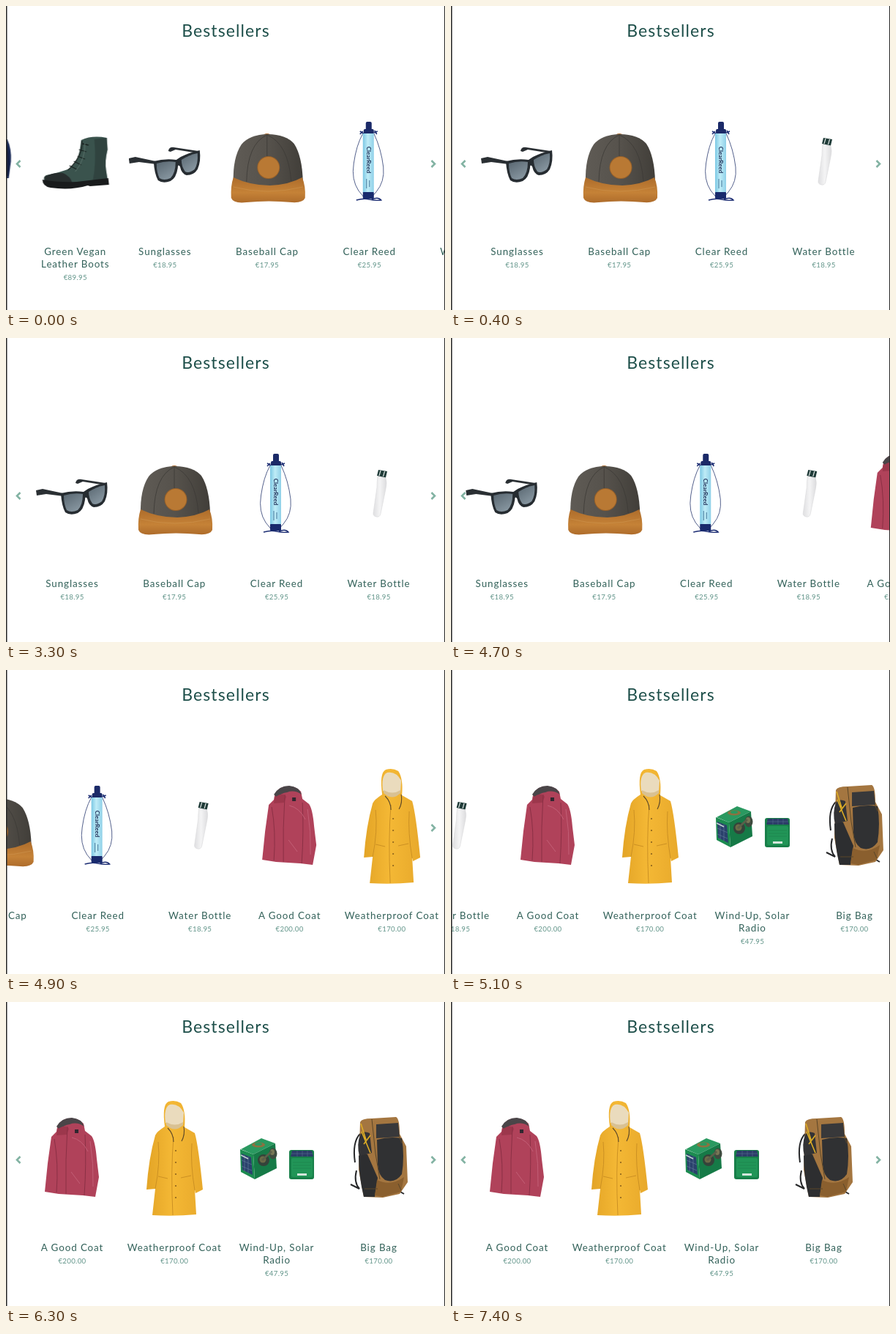
Animation of 600 by 415 pixels, one loop 8000 ms. Source, as an HTML page:

```html
<!DOCTYPE html>
<html lang="en">
<head>
<meta charset="utf-8">
<title>Bestsellers</title>
<style>
  html, body { margin: 0; width: 100%; height: 100%; overflow: hidden; background: #fff; }
  svg { display: block; width: 600px; height: 415px; }
  text { font-family: Lato, Roboto, sans-serif; text-anchor: middle; }
  .title { font-size: 23px; letter-spacing: 1.1px; fill: #1f504b; }
  .name { font-size: 13.4px; letter-spacing: .9px; fill: #326159; }
  .price { font-size: 9.7px; letter-spacing: .3px; fill: #62958a; }
  .label { font-size: 8px; font-weight: 700; fill: #1b2c55; }
  .arrow { fill: none; stroke: #83b3a3; stroke-width: 2.6; }
  .line { fill: none; }
</style>
</head>
<body>
<svg id="stage" viewBox="0 0 600 415">
  <defs>
    <linearGradient id="tube"><stop stop-color="#7cc8e4"/><stop offset=".45" stop-color="#bfecf7"/><stop offset="1" stop-color="#8fd0e8"/></linearGradient>
    <linearGradient id="lens" x2=".6" y2="1"><stop stop-color="#586670"/><stop offset="1" stop-color="#8796a0"/></linearGradient>
    <linearGradient id="felt" x2="1"><stop stop-color="#5f5b55"/><stop offset=".5" stop-color="#56524c"/><stop offset="1" stop-color="#413e39"/></linearGradient>
    <linearGradient id="suede" y2="1" x2="0"><stop stop-color="#ad6c2b"/><stop offset=".6" stop-color="#c58237"/><stop offset="1" stop-color="#ae6c2b"/></linearGradient>
    <linearGradient id="steel" x2="1"><stop stop-color="#dfdfe1"/><stop offset=".5" stop-color="#f4f4f5"/><stop offset="1" stop-color="#dcdcde"/></linearGradient>
    <linearGradient id="rain" x2="1"><stop stop-color="#e3a426"/><stop offset=".45" stop-color="#f4b835"/><stop offset="1" stop-color="#e8a92b"/></linearGradient>
  </defs>
  <text class="title" x="300.5" y="42">Bestsellers</text>
  <path class="arrow" d="M19.5 211l-4.500 4.500 4.500 4.500M581.500 211l4.500 4.500-4.500 4.500"/>
  <g id="pages"></g>
  <path d="M0 0h1.500v415H0zM599 0h1v415h-1z" fill="#292929"/>
</svg>
<script>
const LOOP = 8000, STEP = 100, PAGE = 541.5, SLIDE = 600;
const SLOTS = [90.5, 230.2, 370, 509.5];

const shape = (fill, d, extra = '') => `<path d="${d}" fill="${fill}" ${extra}/>`;
const line = (stroke, width, d) => `<path class="line" d="${d}" stroke="${stroke}" stroke-width="${width}"/>`;
const oval = (fill, x, y, rx, ry = rx) => `<ellipse cx="${x}" cy="${y}" rx="${rx}" ry="${ry}" fill="${fill}"/>`;
const box = (fill, x, y, w, h, r = 0) => `<rect x="${x}" y="${y}" width="${w}" height="${h}" rx="${r}" fill="${fill}"/>`;
const shift = (x, art) => `<g transform="translate(${x})">${art}</g>`;

const jeans = shift(415.5,
  shape('#1b2b58', 'M-88 182H1Q7 195 6 212L3 235H-86Z') + line('#10193a', 2, 'M0 190Q4 210 1 232'));

const boots = shift(415.5,
  shape('#3a534d', 'M102 183Q117 176 137 180L138 196Q134 212 136 224L139 242H56Q47 236 54 231Q74 227 86 222Q97 213 100 197Z') +
  shape('#263532', 'M120 182L137 180 138 196Q134 212 136 224L138 240 118 238Q123 214 120 182Z', 'opacity=".5"') +
  shape('#272d2d', 'M52 233Q64 227 77 228Q87 232 90 242H53Z') +
  shape('#191b1c', 'M49 237Q70 241 96 240L139 235 140 244 114 246 111 245Q88 252 60 248Q49 246 49 237Z') +
  line('#18211f', 1.3, 'M103 184Q105 204 84 224M99 196l10 3M97 205l10 4M92 212l10 5M86 218l10 5M104 188l8 2') +
  line('#5a716a', 1, 'M107 187Q108 209 94 226'));

const sunglasses =
  shape('#2a2f33', 'M41 208L50 206 78 212 79 216 55 213 42 215Z') +
  shape('#2a2f33', 'M95 198Q96 192 103 193L136 198V201L105 196 98 199Z') +
  shape('#262c31', 'M75 212Q90 208 106 210L112 206Q124 200 138 197Q140 212 135 223Q130 231 120 231Q113 229 111 219Q108 215 108 221Q106 235 98 239Q88 243 81 238Q76 229 75 212Z') +
  shape('url(#lens)', 'M79 215Q92 211 105 213Q105 228 98 235Q89 239 83 235Q79 227 79 215Z') +
  shape('url(#lens)', 'M113 210Q124 203 135 201Q136 215 131 223Q123 229 118 226Q113 219 113 210Z');

const cap =
  oval('#a9692c', 230, 176, 4, 2) +
  shape('url(#felt)', 'M184 241Q183 207 195 189Q206 175.500 231 175Q256 175.500 267 188Q278 205 279 239Q234 253 184 241Z') +
  line('#3d3a36', .8, 'M230 176Q203 188 202 240M230 176Q259 188 263 239M230 176V205') +
  shape('url(#suede)', 'M184 234Q207 245 234 245Q260 244 278 234Q283 246 282 262Q279 269 264 268Q232 265 202 268Q184 270 181 262Q180 246 184 234Z') +
  line('#cf954f', .6, 'M184 247Q230 259 279 247') +
  oval('#96602a', 232, 220.5, 15.500) + oval('#b97934', 232, 220.5, 14.500);

const straw =
  line('#41507f', .9, 'M361 174Q352 190 348.500 215Q345 237 355 252L364 263M376 174Q386 195 389 220Q391 240 379 254L371 263') +
  line('#1c2d73', 1.6, 'M357 171l5 3M357 175l4-4M376 173l5-2M377 170l3 5') +
  line('#1c2d73', 1.4, 'M352 265Q362 262 370 264T386 265Q382 260 373 264') +
  box('#1b2a68', 365, 158, 8, 12, 2) + box('#1b2a68', 362, 168, 14, 7, 2) +
  box('url(#tube)', 361, 174, 15, 81) + box('#182a6d', 361, 254, 15, 9, 1) +
  `<text class="label" transform="translate(366 210) rotate(90)">ClearReed</text>` +
  line('#47799a', 1, 'M366 236v13M370 238v9');

const bottle =
  shape('url(#steel)', 'M508 189L519 191Q521 198 519 206L512 240Q511 245 506 244Q501.500 243 502 239L507 204Q507 196 508 189Z', 'stroke="#d9d9db" stroke-width=".6"') +
  shape('#203c39', 'M509 180L521 182 519 190.500 507 188Z') + line('#e6ecea', 1.1, 'M512 181l-2 7M517.5 182l-2 7');

const coat =
  shape('#b0425a', 'M69 177Q70 162 84 159Q98 157 106 166L108 176 117 183Q122 190 124 214L127 239 122 266 105 264 72 262 53 259 57 220 62 184Z') +
  shape('#4a4548', 'M69 170Q76 158 90 158Q103 159 107 170Q97 163 87 167Q79 168 73 174Z') +
  shape('#9c374c', 'M70 174Q81 166 86 173L83 181 69 182Z') +
  line('#8b3045', 1, 'M84 170Q81 215 82 262M108 181Q110 220 107 264M66 187Q72 220 69 260') +
  line('#c4637a', .9, 'M90 185Q104 188 112 204M115 190Q120 220 119 252M89 232l12 16') +
  box('#30272f', 94, 174, 5, 5);

const raincoat =
  shape('url(#rain)', 'M217 170Q213 140 222 136Q231 133 239 138Q246 148 244 171L258 179Q263 196 269 256L259 261 258 256 260 290Q230 293 200 291L204 255 192 256Q195 213 204 182Q206 177 217 170Z') +
  shape('#eadbbd', 'M218 165Q215 144 224 140Q236 138 243 151L242 167Q231 174 218 165Z') +
  shape('#d9c192', 'M219 164Q231 171 242 164V168Q231 179 219 168Z') +
  line('#c88d22', .9, 'M229 184Q225 230 228 291M208 191Q211 220 204 255M254 193Q252 222 258 257M208 238l13 3M239 240l14-3') +
  line('#5d4828', 1.1, 'M221 172Q229 180 229 191M243 170Q245 181 240 190') +
  [203, 219, 235, 251, 267].map(y => oval('#8a621d', 232, y, 1.1)).join('');

const radio =
  shape('#2a9960', 'M321 201L349 186 368 193 338 208Z') +
  shape('#167a47', 'M338 208L368 193 370 227 340 242Z') +
  shape('#1c8b50', 'M320 201L338 208 340 242 321 232Z') +
  shape('#2a416c', 'M322 207L335 212 337 236 323 229Z') +
  line('#7088a6', .5, 'M326 209v22M331 211v22M322 216l14 6M322 224l14 6') +
  oval('#8d7140', 345, 195, 9, 3.5) + oval('#2a9960', 345, 194, 5, 2) +
  oval('#34433a', 352, 216, 8) + oval('#6b6a47', 351, 215, 4.5) +
  oval('#3f4b3f', 365, 207, 5.5, 7.5) + oval('#787756', 364, 205, 3, 4) +
  line('#5b5f4a', 3, 'M350 216l13-12') + line('#c6d2d2', 1.4, 'M321 209l10 5') +
  box('#187f49', 387, 202, 34, 40, 3) + shape('#2b3d67', 'M391 203H418L420 211H389Z') +
  line('#5d7394', .5, 'M398 203v8M405 203v8M412 203v8M390 207h29') +
  box('#219557', 390, 213, 29, 26, 2) + line('#1a824b', .7, 'M392 219h25M392 223h25M392 227h25') +
  box('#d3e6db', 398, 234, 13, 3);

const bag =
  line('#27282a', 2, 'M484 180Q473 191 477 219M479 230Q475 246 483 255L471 249M537 258l7 4') +
  shape('#a47640', 'M484 164Q486 159 500 159L533 157Q538 159 538 180L547 197 549 246 538 262 515 267 489 266 482 229Z') +
  shape('#2d2e30', 'M482 210Q486 205 494 208L508 240 504 266H489Q482 238 482 210Z') +
  shape('#333335', 'M484 181Q489 175 497 179L500 206 483 210Q479 195 484 181Z') +
  shape('#38383a', 'M506 167L536 165 538 184 506 186Z') +
  shape('#303133', 'M507 188Q524 183 541 186Q545 210 541 235Q532 248 518 243Q509 237 508 222Z') +
  shape('#8a5f2e', 'M507 243Q526 252 544 239L540 259 515 266 504 264Z') +
  line('#dfae25', 1.6, 'M486 177L498 206M485 166l7 22M489 194l9-12') +
  line('#5a4629', 1, 'M500 160L505 207 511 242M537 183L541 193M490 255h18M536 248l4 9');

// A product is [slot, name lines, price, art].
const product = ([slot, lines, price, art]) => {
  const x = SLOTS[slot];
  const names = lines.map((s, i) => `<text class="name" x="${x}" y="${340 + 17 * i}">${s}</text>`).join('');
  const cost = lines.length ? `<text class="price" x="${x}" y="${340 + 17.2 * lines.length}">€${price}</text>` : '';
  return box('#fff', x - 48, 130, 96, 165) + art + names + cost;
};

const catalogue = [
  [[2, [], '', jeans], [3, ['Green Vegan', 'Leather Boots'], '89.95', boots]],
  [[0, ['Sunglasses'], '18.95', sunglasses], [1, ['Baseball Cap'], '17.95', cap],
   [2, ['Clear Reed'], '25.95', straw], [3, ['Water Bottle'], '18.95', bottle]],
  [[0, ['A Good Coat'], '200.00', coat], [1, ['Weatherproof Coat'], '170.00', raincoat],
   [2, ['Wind-Up, Solar', 'Radio'], '47.95', radio], [3, ['Big Bag'], '170.00', bag]]
];
const slideStarts = [-399, 4617];

const host = document.getElementById('pages');
host.innerHTML = catalogue.map(page => `<g>${page.map(product).join('')}</g>`).join('');
const pages = [...host.children];

const slide = (page, from, to, delay) => {
  const motion = page.animate(
    [from, to].map(x => ({ transform: `translateX(${x}px)` })),
    { duration: SLIDE, delay, easing: 'ease-in-out', fill: 'both', composite: 'add' });
  motion.pause();
  return motion;
};
const motions = slideStarts.flatMap((start, i) => [
  slide(pages[i], 0, -PAGE, start),
  slide(pages[i + 1], PAGE, 0, start)
]);

function draw(now) {
  const t = Math.floor(now % LOOP / STEP) * STEP;
  motions.forEach(motion => { motion.currentTime = t; });
  pages.forEach((page, i) => {
    const entered = i === 0 || t >= slideStarts[i - 1];
    const gone = i < slideStarts.length && t >= slideStarts[i] + SLIDE;
    page.style.visibility = entered && !gone ? 'visible' : 'hidden';
  });
}

const began = performance.now();
function tick() {
  draw(performance.now() - began);
  requestAnimationFrame(tick);
}
tick();
</script>
</body>
</html>
```
